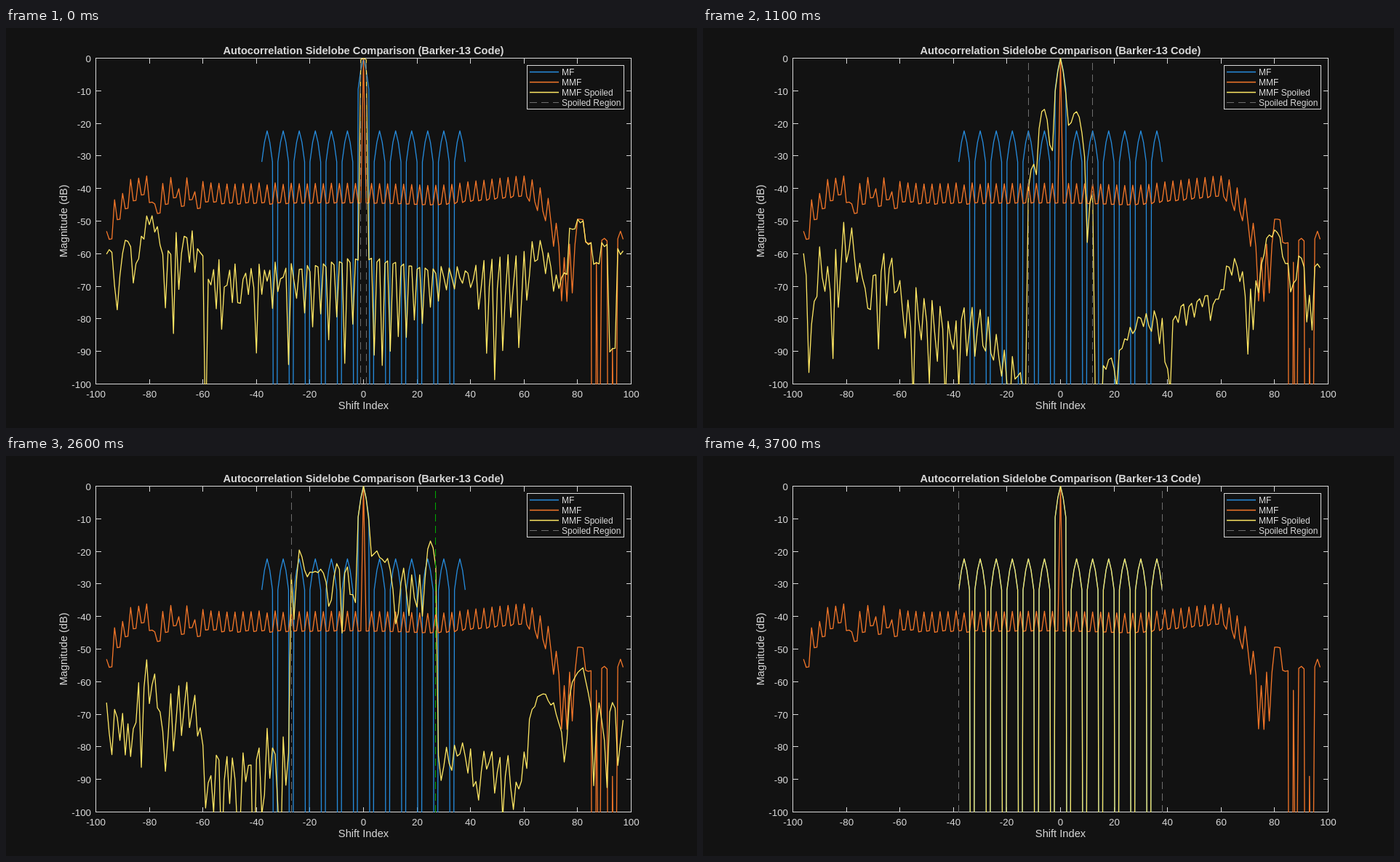
Recreate the animation shown at these times as an HTML page. Size 950x550 px, loop 3.8 s.

```html
<!DOCTYPE html>
<html lang="en">
<head>
<meta charset="utf-8">
<title>Autocorrelation Sidelobe Comparison</title>
<style>
  html, body { margin: 0; width: 100%; height: 100%; overflow: hidden; background: #121212; }
  svg { display: block; width: 950px; height: 550px; }
  text { font-family: "Liberation Sans", Arial, sans-serif; font-size: 13.33px; fill: #d9d9d9; }
  .label { font-size: 14.67px; }
  .title { font-size: 14.67px; font-weight: bold; }
  .key { font-size: 12px; }
  .axis { fill: none; stroke: #d9d9d9; stroke-width: 1; shape-rendering: crispEdges; }
  .line { fill: none; stroke-width: 1.3; stroke-linejoin: round; }
  .edge { fill: none; stroke: #6e6e6e; stroke-width: 1; stroke-dasharray: 10 6; shape-rendering: crispEdges; }
</style>
</head>
<body>
<svg id="stage" viewBox="0 0 950 550">
  <defs><clipPath id="area"><rect x="123" y="41" width="737" height="449"/></clipPath></defs>
  <rect width="950" height="550" fill="#121212"/>
  <g id="axes"></g>
  <g clip-path="url(#area)">
    <path id="mf" class="line" stroke="#268cdd"/>
    <path id="mmf" class="line" stroke="#f57729"/>
    <path id="spoiled" class="line" stroke="#ffe864"/>
    <path id="left" class="edge"/>
    <path id="right" class="edge"/>
  </g>
  <g id="legend"></g>
</svg>
<script>
const start = performance.now();
const $ = id => document.getElementById(id);

// Axes geometry
const X0 = 123.5, X1 = 859.5, Y0 = 41.5, Y1 = 489.5;
const px = lag => 491.5 + lag * 3.68;
const py = db => Y0 - db * 4.48;

function add(parent, tag, attrs, text) {
  const el = document.createElementNS("http://www.w3.org/2000/svg", tag);
  for (const name in attrs) el.setAttribute(name, attrs[name]);
  if (text) el.textContent = text;
  $(parent).appendChild(el);
}

function drawAxes() {
  let d = `M${X0} ${Y0}H${X1}V${Y1}H${X0}Z`;
  for (let v = -100; v <= 100; v += 20) {
    const x = Math.round(px(v) - 0.5) + 0.5;
    d += `M${x} ${Y1}v-7M${x} ${Y0}v7`;
    add("axes", "text", { x, y: 508, "text-anchor": "middle" }, String(v));
  }
  for (let v = -100; v <= 0; v += 10) {
    const y = Math.round(py(v) - 0.5) + 0.5;
    d += `M${X0} ${y}h7M${X1} ${y}h-7`;
    add("axes", "text", { x: 117, y: y + 5, "text-anchor": "end" }, String(v));
  }
  add("axes", "path", { class: "axis", d });
  add("axes", "text", { class: "title", x: 491.5, y: 36, "text-anchor": "middle" },
    "Autocorrelation Sidelobe Comparison (Barker-13 Code)");
  add("axes", "text", { class: "label", x: 491.5, y: 524, "text-anchor": "middle" }, "Shift Index");
  add("axes", "text", { class: "label", transform: "translate(84 265.5) rotate(-90)", "text-anchor": "middle" },
    "Magnitude (dB)");
}

function drawLegend() {
  add("legend", "rect", { x: 716.5, y: 51.5, width: 133, height: 60, class: "axis", style: "fill:#121212" });
  [["MF", "#268cdd"], ["MMF", "#f57729"], ["MMF Spoiled", "#ffe864"], ["Spoiled Region"]].forEach(([name, color], i) => {
    const y = 60.5 + i * 14;
    const look = color ? { class: "line", stroke: color } : { class: "edge" };
    add("legend", "path", { d: `M720 ${y}H760`, ...look });
    add("legend", "text", { class: "key", x: 764, y: y + 4.5 }, name);
  });
}

// Code with three samples per chip, filter of four code lengths
const code = [..."+++++--++-+-+"].flatMap(c => Array(3).fill(c === "+" ? 1 : -1));
const L = code.length, N = 4 * L, M = N + L - 1, MID = 96;

function convolve(h) {
  const y = new Float64Array(M);
  for (let i = 0; i < N; i++)
    for (let j = 0; j < L; j++) y[i + j] += h[i] * code[j];
  return y;
}

// Solves A x = b for a symmetric positive definite A (Cholesky)
function solve(A, b) {
  const n = b.length, x = Float64Array.from(b);
  for (let i = 0; i < n; i++)
    for (let j = 0; j <= i; j++) {
      let sum = A[i][j];
      for (let k = 0; k < j; k++) sum -= A[i][k] * A[j][k];
      A[i][j] = i === j ? Math.sqrt(sum) : sum / A[j][j];
    }
  for (let i = 0; i < n; i++) {
    for (let k = 0; k < i; k++) x[i] -= A[i][k] * x[k];
    x[i] /= A[i][i];
  }
  for (let i = n - 1; i >= 0; i--) {
    for (let k = i + 1; k < n; k++) x[i] -= A[k][i] * x[k];
    x[i] /= A[i][i];
  }
  return x;
}

// Least-squares filter that ignores sidelobes within +-width of the peak
function mismatched(width, load) {
  const A = Array.from({ length: N }, () => new Float64Array(N));
  for (let n = 0; n < M; n++) {
    if (Math.abs(n - MID) <= width) continue;
    const lo = Math.max(0, n - L + 1), hi = Math.min(N - 1, n);
    for (let i = lo; i <= hi; i++)
      for (let j = lo; j <= i; j++) A[i][j] += code[n - i] * code[n - j];
  }
  const b = new Float64Array(N);
  for (let i = 0; i < N; i++) {
    A[i][i] += load;
    b[i] = code[MID - i] || 0;
  }
  return convolve(solve(A, b));
}

function trace(y, width) {
  const peak = y.reduce((m, v) => Math.max(m, Math.abs(v)), 0);
  let d = "", pen = "M";
  y.forEach((v, n) => {
    const lag = n - MID, level = Math.abs(v) / peak;
    if (Math.abs(lag) > width && level < 1e-9) { pen = "M"; return; }
    const db = 20 * Math.log10(level + 2.2e-16);
    d += pen + px(lag).toFixed(2) + " " + py(db).toFixed(2);
    pen = "L";
  });
  return d;
}

drawAxes();
drawLegend();

const matched = new Float64Array(N);
for (let i = 0; i < N; i++) matched[i] = code[MID - i] || 0;
$("mf").setAttribute("d", trace(convolve(matched), L - 1));
$("mmf").setAttribute("d", trace(mismatched(0, 0), M));

const STEPS = 38, HOLD = 100;
const curves = Array.from({ length: STEPS }, (_, i) => trace(mismatched(i + 1, 0.01), i + 1));

function setEdge(id, lag, green) {
  $(id).setAttribute("d", `M${Math.floor(px(lag)) + 0.5} ${Y1}V${Y0}`);
  $(id).style.stroke = green ? "#00ac00" : "#6e6e6e";
}

let shown = -1;
function frame() {
  const step = Math.floor(Math.max(0, performance.now() - start) / HOLD) % STEPS;
  if (step !== shown) {
    const width = step + 1;
    $("spoiled").setAttribute("d", curves[step]);
    setEdge("left", -width, width > 12 && width < 25);
    setEdge("right", width, width > 19 && width < 30);
    shown = step;
  }
  requestAnimationFrame(frame);
}
frame();
</script>
</body>
</html>
```
